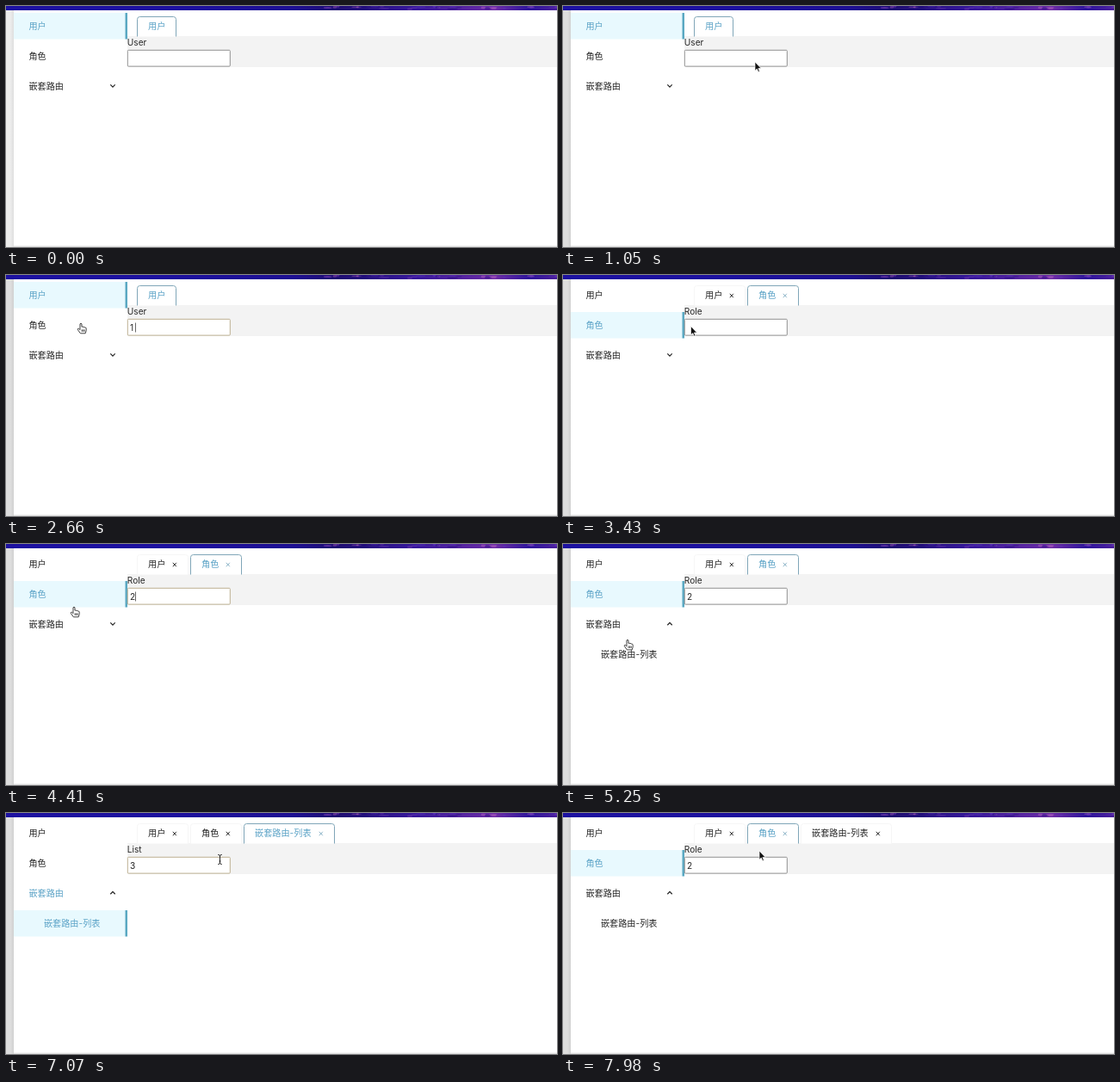
Animation, 640 px wide and 280 px high, one loop 8000 ms. Source, as an HTML page:

```html
<!DOCTYPE html>
<html lang="zh-CN">
<head>
<meta charset="utf-8">
<title>Tabs</title>
<style>
  html, body { margin: 0; width: 100%; height: 100%; overflow: hidden; background: #fff; }
  svg { display: block; width: 640px; height: 280px; }
  text { font: 10.15px Inter, "Noto Sans CJK SC", "Noto Sans CJK", sans-serif; }
</style>
</head>
<body>
<svg id="stage" viewBox="0 0 640 280" xmlns="http://www.w3.org/2000/svg">
  <defs>
    <linearGradient id="sky">
      <stop offset="0" stop-color="#1c10a0"/>
      <stop offset=".3" stop-color="#1c0f9e"/>
      <stop offset=".52" stop-color="#1d0e92"/>
      <stop offset=".6" stop-color="#1e0c70"/>
      <stop offset=".74" stop-color="#35179a"/>
      <stop offset=".89" stop-color="#6a2ba4"/>
      <stop offset=".95" stop-color="#2c149a"/>
      <stop offset="1" stop-color="#4a1f9c"/>
    </linearGradient>
    <linearGradient id="edge">
      <stop offset="0" stop-color="#000" stop-opacity="0"/>
      <stop offset="1" stop-color="#000" stop-opacity=".06"/>
    </linearGradient>
  </defs>
</svg>
<script>
const LOOP = 8000, FADE = 300;
const TEAL = [90, 162, 198], INK = [38, 38, 38];
const stage = document.getElementById('stage');

function add(tag, attrs, parent = stage, label) {
  const el = document.createElementNS('http://www.w3.org/2000/svg', tag);
  set(el, attrs);
  if (label) el.textContent = label;
  parent.appendChild(el);
  return el;
}
function set(el, attrs) {
  for (const k in attrs) el.setAttribute(k, attrs[k]);
}
const rect = (x, y, width, height, fill, parent) => add('rect', { x, y, width, height, fill }, parent);
const text = (x, y, label, parent) => add('text', { x, y, fill: '#262626' }, parent, label);
const show = (el, on) => set(el, { visibility: on ? 'visible' : 'hidden' });
const clamp = v => Math.max(0, Math.min(1, v));
const ease = v => v * v * (3 - 2 * v);
const ramp = (t, from, span) => ease(clamp((t - from) / span));
const mix = (a, b, k) => `rgb(${a.map((v, i) => Math.round(v + (b[i] - v) * k))})`;

// Page switches: [time, page]
const PAGES = ['User', 'Role', 'List'];
const visits = [[-FADE, 0], [3080, 1], [5600, 2], [7630, 1]];
const OPEN_AT = 4760;
// Per page: focus, typing and blur times
const fields = [
  { key: '1', focus: 1120, typed: 2200, blur: 3010 },
  { key: '2', focus: 3780, typed: 4060, blur: 4740 },
  { key: '3', focus: 6230, typed: 6510, blur: 7600 }
];

// Backdrop
const strip = rect(0, 5, 9, 275, '#ececec');
rect(5, 5, 4, 275, 'url(#edge)');
rect(9, 278.6, 631, 1.4, '#e2e2e2');
rect(0, 0, 640, 5, 'url(#sky)');
let seed = 11;
const rnd = () => (seed = seed * 16807 % 2147483647) / 2147483647;
for (let i = 0; i < 34; i++) {
  const x = 640 - 280 * rnd();
  add('ellipse', {
    cx: x, cy: rnd() * 3.6, rx: 1.5 + rnd() * 5, ry: .6 + rnd() * .8,
    fill: ['#8a48c4', '#1e0c78', '#5c34c0', '#c46cc4'][i % 4], opacity: .2 + rnd() * .35
  });
}
rect(141, 35, 499, 36, '#f3f3f3');

// Side menu
function menuItem(label, x, y) {
  const g = add('g', {});
  const mark = add('g', {}, g);
  rect(9, y - 15, 130, 30.5, '#e8f9fe', mark);
  rect(138.5, y - 15, 2.5, 30.5, '#5aa8c2', mark);
  return { g, mark, label: text(x, y + 3.8, label, g) };
}
const sub = menuItem('嵌套路由-列表', 44, 128);
const items = [menuItem('用户', 26.5, 23), menuItem('角色', 26.5, 58), sub];
const parentLabel = text(26.5, 96.8, '嵌套路由');
const chevron = add('path', { d: 'M-2.7-1.4L0 1.4L2.7-1.4', fill: 'none', 'stroke-width': 1.25 });

// Tabs
function outline(x, w) {
  const r = x + w;
  return `M${x} 35.5V15.5Q${x} 12.5 ${x + 3} 12.5H${r - 3}Q${r} 12.5 ${r} 15.5V35.5`;
}
function tab(label, x, w) {
  const g = add('g', {});
  const r = x + w;
  const box = add('path', { d: outline(x, w), fill: '#fff', 'stroke-width': 1 }, g);
  const name = text(x + 12.6, 26.8, label, g);
  const cross = add('path', {
    d: `M${r - 17.7} 21.8l4 4.4m0-4.4l-4 4.4`, fill: 'none', 'stroke-width': 1
  }, g);
  return { g, box, name, cross };
}
const tabs = [tab('用户', 152.5, 59), tab('角色', 214.5, 59), tab('嵌套路由-列表', 276.5, 105)];

// Page body
const title = text(140.8, 46.3, 'User');
const input = add('rect', { x: 141.3, y: 51.3, width: 119, height: 18.8, rx: 1, fill: '#fff' });
const value = text(144, 64.8, ' ');
const caret = rect(150, 55.5, .8, 11, '#444');

// Pointers, each drawn around its hot spot
const pointers = {
  arrow: add('path', {
    d: 'M0 0V10.2L2.3 8.1L3.8 11.6L5.4 10.9L3.9 7.5H7.1Z',
    fill: '#111', stroke: '#fff', 'stroke-width': .7
  }),
  hand: add('path', {
    d: 'M-1 .8Q0-.6 1 .8V4.2Q2.2 3.5 2.9 4.5Q4.2 4 4.7 5Q6.2 4.8 6.2 6.2V8.6L5.2 11.8H-.6L-3.6 7.6Q-4 6 -2.6 6.2L-1 7.6Z'
      + 'M1.1 7.4V9.8M2.7 7.4V9.8M4.2 7.4V9.8',
    fill: '#fff', stroke: '#222', 'stroke-width': .85, 'stroke-linejoin': 'round'
  }),
  beam: add('path', {
    d: 'M-2.2-5.5Q0-5.5 0-4.2Q0-5.5 2.2-5.5M0-4.2V4.2M-2.2 5.5Q0 5.5 0 4.2Q0 5.5 2.2 5.5M-1 2H1',
    fill: 'none', stroke: '#222', 'stroke-width': 1
  })
};
// [time, x, y]
const path = [
  [70, 330, -14], [350, 264, 112], [770, 223, 65], [1050, 223, 65], [1120, 222, 61],
  [2270, 222, 61], [2660, 87, 56], [2870, 85, 57], [2940, 80, 58], [3220, 80, 58],
  [3640, 216, 61], [4130, 216, 61], [4410, 79, 73], [4690, 72, 91], [5060, 72, 91],
  [5400, 77, 125], [5670, 77, 125], [5880, 188, 80], [6160, 222, 62], [6790, 222, 62],
  [7070, 248.5, 54], [7420, 238, 23], [7770, 238, 23], [7980, 228, 44], [8000, 227, 46]
];
// [time, pointer]
const shapes = [
  [0, ''], [70, 'arrow'], [1080, 'beam'], [2200, ''], [2270, 'beam'], [2380, 'arrow'],
  [2520, 'hand'], [3360, 'arrow'], [3560, 'beam'], [4060, ''], [4130, 'beam'], [4230, 'arrow'],
  [4300, 'hand'], [5740, 'arrow'], [6070, 'beam'], [6510, ''], [6790, 'beam'],
  [7140, 'arrow'], [7280, 'hand'], [7840, 'arrow']
];
const latest = (list, t) => list.filter(e => e[0] <= t).pop();

function pointerAt(t) {
  const i = path.findIndex(p => p[0] > t);
  if (i < 1) return path[0].slice(1);
  const [a, b] = [path[i - 1], path[i]];
  const k = ease((t - a[0]) / (b[0] - a[0]));
  return [a[1] + (b[1] - a[1]) * k, a[2] + (b[2] - a[2]) * k];
}

function render(t) {
  const [since, page] = latest(visits, t);
  const before = latest(visits, since - 1);
  const fade = ramp(t, since, FADE);
  const level = i => i === page ? fade : before && i === before[1] ? 1 - fade : 0;
  const opened = ramp(t, OPEN_AT, FADE);

  strip.setAttribute('fill', t < 1050 ? '#ececec' : '#dedede');
  items.forEach((m, i) => {
    set(m.mark, { opacity: level(i) });
    set(m.label, { fill: mix(INK, TEAL, level(i)) });
  });
  set(sub.g, { opacity: opened, transform: `translate(0 ${(opened - 1) * 12})` });
  set(parentLabel, { fill: mix(INK, TEAL, level(2)) });
  set(chevron, {
    transform: `translate(124 92.8) scale(1 ${1 - 2 * opened})`,
    stroke: mix(INK, TEAL, t < 6440 ? level(2) * .7 : 0)
  });

  const count = t < 3080 ? 1 : t < 5600 ? 2 : 3;
  tabs.forEach((b, i) => {
    show(b.g, i < count);
    const k = level(i);
    set(b.box, { stroke: mix([246, 246, 246], [128, 166, 184], k) });
    set(b.name, { fill: mix(INK, TEAL, k) });
    set(b.cross, { stroke: mix(INK, [140, 180, 200], k) });
  });
  // A lone tab cannot be closed
  set(tabs[0].box, { d: outline(152.5, count > 1 ? 59 : 45) });
  show(tabs[0].cross, count > 1);

  const f = fields[page];
  const typed = t >= f.typed, focused = t >= f.focus && t < f.blur;
  title.textContent = PAGES[page];
  value.textContent = typed ? f.key : '';
  set(input, { stroke: focused ? '#bdb092' : '#929292' });
  set(caret, { x: typed ? 150 : 144 });
  show(caret, focused && (t - (typed ? f.typed : f.focus)) % 1000 < 500);

  const [x, y] = pointerAt(t), shape = latest(shapes, t)[1];
  for (const name in pointers) {
    show(pointers[name], name === shape);
    set(pointers[name], { transform: `translate(${x} ${y})` });
  }
}

const start = performance.now();
function tick() {
  render((performance.now() - start) % LOOP);
  requestAnimationFrame(tick);
}
tick();
</script>
</body>
</html>
```
